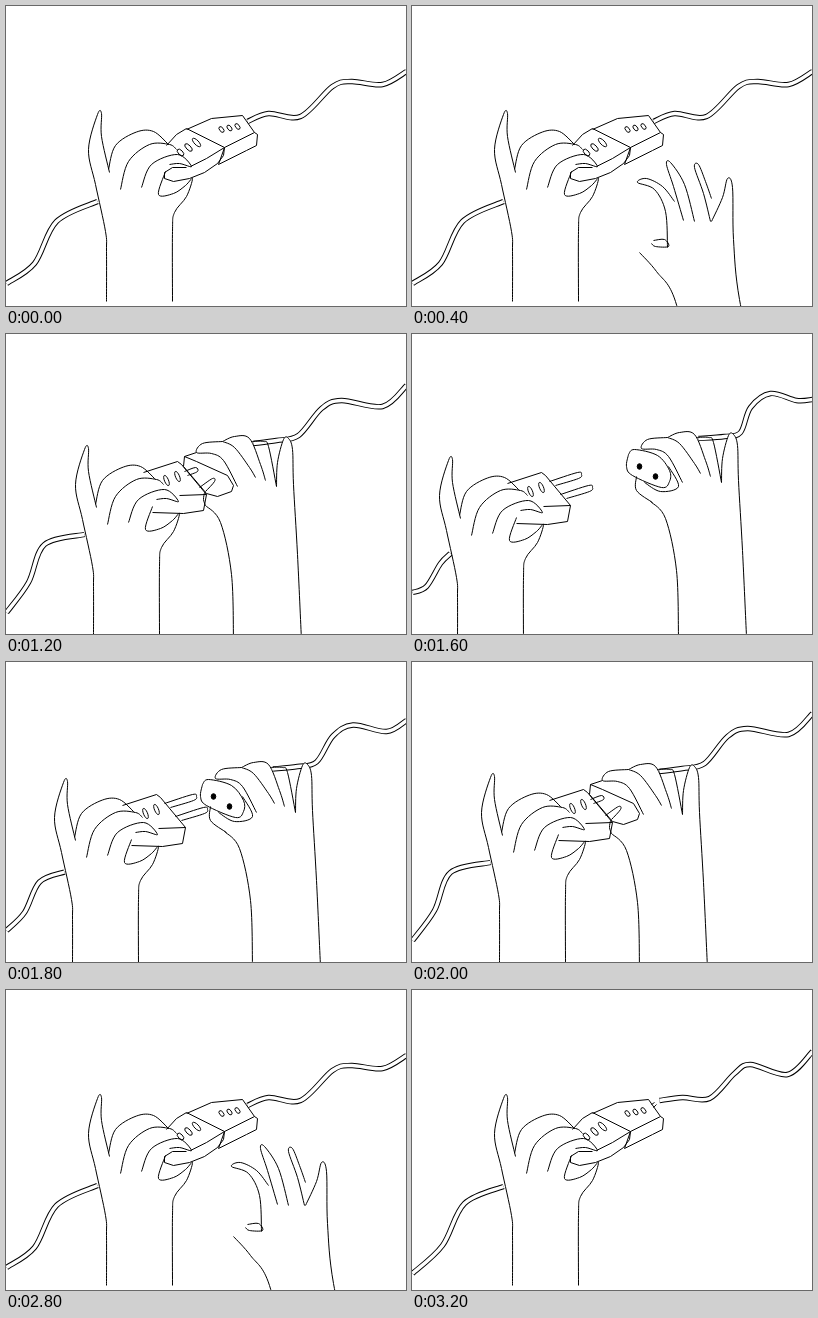
Write an HTML page with a canvas that moves like this. It is 400x300 px and loops after 3400 ms.

```html
<!DOCTYPE html>
<html>
<head>
<meta charset="utf-8">
<style>
html, body { margin: 0; height: 100%; overflow: hidden; background: #fff; }
canvas { display: block; }
</style>
</head>
<body>
<canvas id="stage" width="400" height="300"></canvas>
<script>
const ctx = document.getElementById('stage').getContext('2d');

const parse = s => s.split(' ').map(p => p.split(',').map(Number));

// Smooth curve through key points
function trace(p) {
  const n = p.length - 1;
  ctx.beginPath();
  ctx.moveTo(...p[0]);
  for (let i = 0; i < n; i++) {
    const a = p[Math.max(i - 1, 0)], b = p[i], c = p[i + 1], d = p[Math.min(i + 2, n)];
    ctx.bezierCurveTo(b[0] + (c[0] - a[0]) / 6, b[1] + (c[1] - a[1]) / 6,
      c[0] - (d[0] - b[0]) / 6, c[1] - (d[1] - b[1]) / 6, c[0], c[1]);
  }
}
function stroke(color = '#000', width = 1) {
  ctx.strokeStyle = color;
  ctx.lineWidth = width;
  ctx.stroke();
}
function fill(color = '#fff') {
  ctx.fillStyle = color;
  ctx.fill();
}
function curve(...list) {
  for (const s of list) { trace(parse(s)); stroke(); }
}
// Outlines that hide what lies behind them
function solid(...list) {
  for (const s of list) { trace(parse(s)); fill(); stroke(); }
}
function poly(s) {
  ctx.beginPath();
  parse(s).forEach(p => ctx.lineTo(...p));
  stroke();
}
function oval(x, y, rx, ry, turn = 0) {
  ctx.beginPath();
  ctx.ellipse(x, y, rx, ry, turn, 0, 7);
  stroke();
}
function at(x, y, draw, sx = 1) {
  ctx.save();
  ctx.transform(sx, 0, 0, 1, x, y);
  draw();
  ctx.restore();
}
function cables(pair) {
  for (const p of pair) {
    trace(p);
    stroke('#000', 5.4);
    stroke('#fff', 3.5);
  }
}

function leftHand() {
  curve(
    '103,166 95,130 95,107 91,108 82,143 89,178 99,225 100,245 100,295',
    '102,163 109,139 130,125.5 147,125 162,138',
    '114,183 122,155 143,138 163,138 170,143',
    '135,181 145,158 171,148 185,160 173,157 163,158',
    '159,165 152,188 167,187 179,179 186,172 180,190 168,206 166,225 166,295');
}

// Both halves pushed together
function joined() {
  poly('184,160 200,152 218,141 180,122 170,128 160,139');
  poly('218,141 217,149 211,157 198,166 183,172 167,175 158,172 158,166 166,161 180,161');
  poly('180,123 205,112 236,109 248,126 251,128 250,139 240,144 212,158');
  poly('212,158 218,141 248,126');
  for (let i = 0; i < 3; i++) {
    oval(190 - 8 * i, 136 + 5 * i, 5.5 - .7 * i, 2.2, .8);
    oval(215 + 8 * i, 123 - 1.5 * i, 3.3, 1.9, .9);
  }
}

function plug() {
  poly('150,131 184,120 188,123 213,153 186,154');
  poly('213,153 210,169 190,172 159,171');
  oval(173, 139, 2, 5.5, -.4);
  oval(184, 135, 2, 5.5, -.4);
}
function prongs() {
  const prong = '192,129 220,120 224,122 221,126 198,133';
  curve(prong);
  at(11, 13, () => curve(prong));
}

function openHand() {
  trace(parse('233,158 240,112 249,131 276,132 300,160 261,200 233,158'));
  fill();
  solid(
    '233,158 231,122 220,100 203,93 212,89 228,97 240,112',
    '249,131 239,97 232,75 236,73 250,95 260,132',
    '276,132 269,104 260,78 264,75 271,92 277,109',
    '277,132 288,108 293,89 298,98 299,150 305,210 326,304');
  curve('219,151 230,150 234,157 221,157 217,154',
    '205,163 222,182 241,212 262,304');
}

function gripHand() {
  solid(
    '249,108 268,113 290,127 300,160 312,215 333,304',
    '238,165 230,140 219,113 223,111 236,140 241,155',
    '248,157 241,125 242,104 248,106 255,145 253,160 248,157');
  curve('248,108 256,112 268,147', '254,112 270,122 280,146',
    '212,157 207,162 222,167 236,166 238,160',
    '207,162 228,171 249,215 270,304');
}

function pullHand() {
  solid(
    '231,152 217,126 205,119 190,118 196,109 216,107',
    '216,107 228,102 243,104 254,130 259,146',
    '270,152 271,128 277,105 282,104 286,115 287,150 291,220 295,306');
  curve('216,107 228,113 243,133 249,143',
    '245,107 257,107 262,112 270,152',
    '199,171 214,188 225,240 227,306');
}

function socketFacing() {
  solid('216,120 222,115 245,121 257,136 257,147 249,153 220,141 214,132 216,120');
  curve('256,132 266,152 248,157 232,148', '224,142 224,156 240,168');
  for (const [x, y] of [[227, 132], [243, 142]]) {
    oval(x, y, 2.3, 2.8);
    fill('#000');
  }
}
function socketNear() {
  poly('190,118 178,122 177,132 200,159 211,162 225,157 227,151 221,141 190,127 178,122');
  curve('178,137 189,133 191,137 181,141', '193,153 206,144 208,147 199,157',
    '198,158 197,165 199,171');
}

// Each pair: left cable, right cable
const pair = (left, right) => [parse(left), parse(right)];
const mix = (a, b) => a.map((line, i) => line.map((p, j) =>
  p.map((v, k) => (v + b[i][j][k]) / 2)));
const lift = (p, dy) => p.map(([x, y]) => [x, y + dy]);

const rest = pair('0,277 28,257 50,215 91,195',
  '241,115 262,107 294,110 326,80 345,75 376,78 400,65');
const loose = pair('0,283 30,255 52,213 91,196',
  '247,110 270,107 297,108 322,83 338,74 375,84 400,61');
const raised = pair('0,269 32,250 57,213 93,201',
  '250,110 275,103 290,99 310,77 328,69 370,76 400,48');
const near = pair('0,278 22,248 38,210 78,200',
  '247,109 270,106 292,101 315,74 335,66 376,72 400,51');
const far = pair('0,258 14,252 28,229 38,219',
  '286,104 312,102 328,98 338,73 358,59 384,66 400,65');
const tug = [mix(raised, near)[0], lift(raised[1], -6)];

function together(lines, hand) {
  cables(lines);
  joined();
  leftHand();
  if (hand) hand();
}
function apart(lines, lx, ly, rx, ry) {
  cables(lines);
  at(lx, ly, () => { plug(); prongs(); leftHand(); });
  at(rx + 39, ry - 4, pullHand);
  at(rx, ry, socketFacing);
}

const poses = {
  rest: () => together(rest),
  peek: () => together(rest, () => at(124, 151, openHand, .724)),
  rise: () => together(rest, () => at(22, 83, openHand)),
  open: () => together(raised, openHand),
  grip: () => together(loose, gripHand),
  tug: () => together(tug, () => at(8, -3, pullHand)),
  near() {
    cables(near);
    at(-13, 7, () => { plug(); leftHand(); });
    socketNear();
    pullHand();
  },
  part: () => apart(mix(near, far), -34, 12, -20, 2),
  far: () => apart(far, -55, 18, 0, 0),
  settle() {
    together(loose);
    curve('239,114 242,112', '241,117 244,114');
  }
};
const order = ('rest peek rise open grip tug near part far ' +
  'part near tug open grip rise peek settle').split(' ');

ctx.lineJoin = 'round';
ctx.translate(.5, .5);
function frame() {
  ctx.clearRect(-1, -1, 402, 302);
  poses[order[Math.floor(performance.now() / 200) % order.length]]();
  requestAnimationFrame(frame);
}
frame();
</script>
</body>
</html>
```
